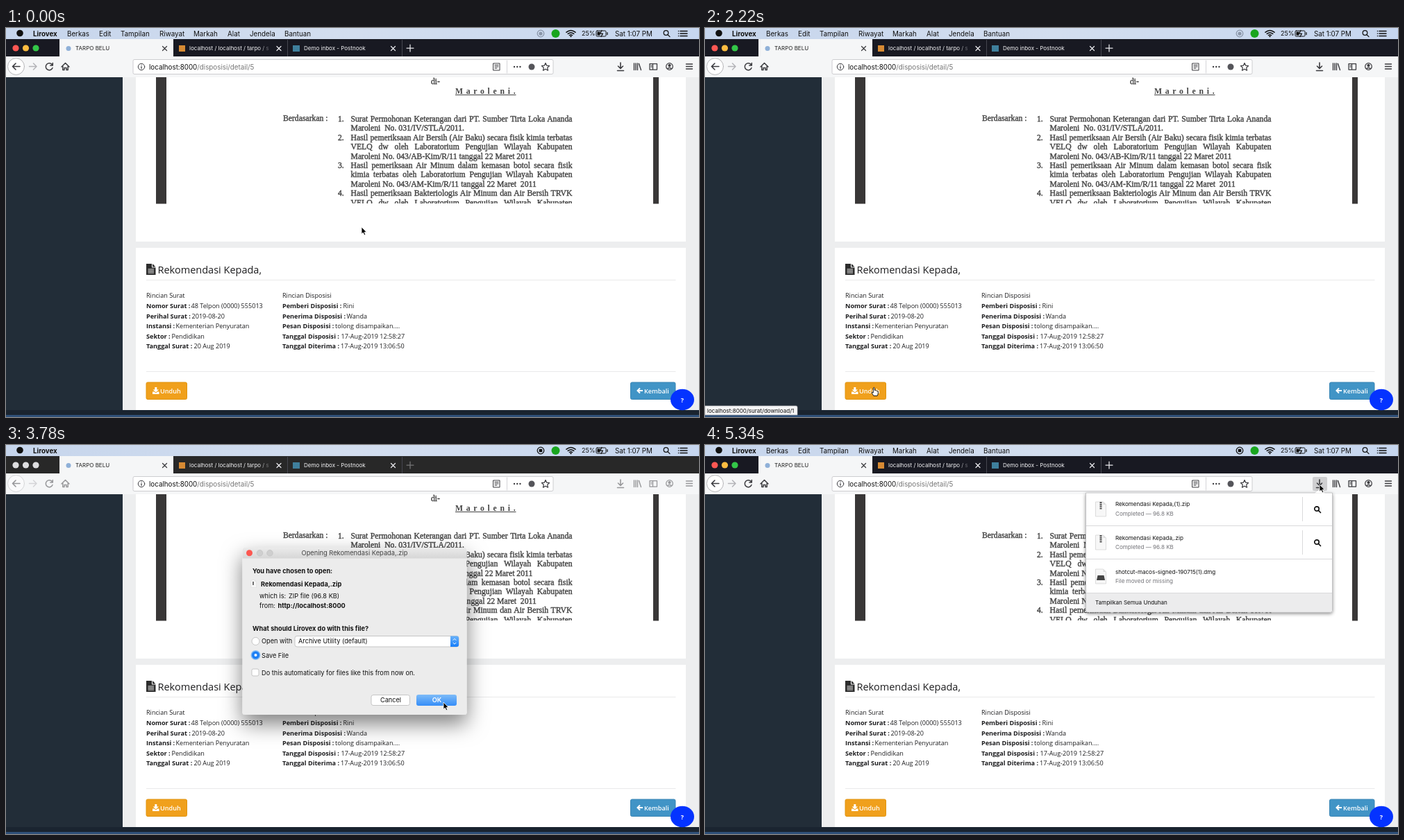
Animation, 998 px wide and 561 px high, one loop 5.4 s. Source, as an HTML page:

```html
<!DOCTYPE html>
<html lang="id">
<head>
<meta charset="utf-8">
<title>Unduh surat</title>
<style>
html, body { margin: 0; width: 100%; height: 100%; overflow: hidden; background: #fff; }
svg { display: block; width: 998px; height: 561px; }
text { white-space: pre; }
.ui { font-family: Inter, Roboto, sans-serif; font-size: 9.8px; fill: #111; }
.tab { font-size: 8px; fill: #f4f4f6; }
.small { font-size: 8.05px; }
.dlg { font-size: 9.2px; }
.b { font-weight: 700; }
.page { font-family: "Open Sans", "Noto Sans", sans-serif; font-size: 9.1px; fill: #1d1d1f; }
.btn { font-weight: 600; fill: #fff; }
.i { fill: none; stroke: #3b3b3f; stroke-width: 1.25; stroke-linecap: round; stroke-linejoin: round; }
.w { stroke: #e8e8ec; }
.doc { font: 11.7px/13.4px "Liberation Serif", "Noto Serif", serif; color: #444; position: relative; height: 182px; overflow: hidden; -webkit-text-stroke: .4px #444; }
.doc div { position: absolute; white-space: nowrap; }
.doc .just { width: 319px; text-align: justify; text-align-last: justify; }
</style>
</head>
<body>
<svg viewBox="0 0 998 561">
  <defs>
    <linearGradient id="bar" x2="0" y2="1"><stop stop-color="#ebebeb"/><stop offset="1" stop-color="#d6d6d6"/></linearGradient>
    <linearGradient id="blue" x2="0" y2="1"><stop stop-color="#6bb3fa"/><stop offset="1" stop-color="#157dfa"/></linearGradient>
    <linearGradient id="sky"><stop stop-color="#c6d5ec"/><stop offset=".5" stop-color="#d3deef"/><stop offset="1" stop-color="#c6d6ef"/></linearGradient>
    <linearGradient id="fade"><stop offset=".83" stop-color="#fff"/><stop offset="1" stop-color="#000"/></linearGradient>
    <mask id="cut"><rect x="264" y="20" width="120" height="20" fill="url(#fade)"/></mask>
    <clipPath id="above"><path d="M0 0H998V551H0Z"/></clipPath>
    <filter id="shade" x="-30%" y="-30%" width="160%" height="170%"><feDropShadow dx="0" dy="13" stdDeviation="15" flood-opacity=".5"/></filter>
    <filter id="soft" x="-10%" y="-10%" width="120%" height="125%"><feDropShadow dx="0" dy="2" stdDeviation="2.5" flood-opacity=".45"/></filter>
    <g id="file"><path d="M0 0H11L15 4V21H0Z" fill="#f7f7f7" stroke="#cfcfcf" stroke-width=".7"/><path d="M11 0V4H15" fill="#ddd"/></g>
    <g id="lens" class="i" style="stroke:#111;stroke-width:1.7"><circle cx="-1" cy="-1" r="3.2"/><path d="M1.5 1.5L4.5 4.5"/></g>
    <path id="x" d="M-3-3L3 3M3-3L-3 3"/>
  </defs>

  <!-- menu bar -->
  <rect width="998" height="16" fill="url(#sky)"/>
  <g class="ui">
    <circle cx="20" cy="7.5" r="4.8"/>
    <text x="39" y="11.5" class="b">Lirovex</text>
    <g id="menus"></g>
    <g id="recOff" class="i" style="stroke:#8a95a8"><circle cx="770" cy="8" r="4.8"/><circle cx="770" cy="8" r="2" fill="#8a95a8"/></g>
    <g id="recOn" class="i" style="stroke:#111"><circle cx="770" cy="8" r="4.8"/><path d="M768.3 6.3H771.7V9.7H768.3Z" fill="#111"/></g>
    <circle cx="791.5" cy="8" r="6" fill="#19a51f"/>
    <g class="i" style="stroke:#111"><path d="M807 6.2Q813.5.8 820 6.2M809.2 8.4Q813.5 5 817.8 8.4M811.4 10.5Q813.5 9 815.6 10.5" stroke-width="1.5"/><circle cx="813.5" cy="12.2" r=".5"/>
      <rect x="850" y="4" width="14" height="8" rx="1.3" stroke-width="1"/><path d="M866 6.5V9.5M858 3.5L855.5 8H859.5L857 12.5"/>
      <circle cx="950.5" cy="7" r="3.3"/><path d="M953 9.6L956 12.6"/><path d="M971 4.5H981M971 8H981M971 11.5H981M968.5 4.5h.1M968.5 8h.1M968.5 11.5h.1" stroke-width="1.5"/></g>
    <rect x="851.5" y="5.5" width="4" height="5"/>
    <text x="829" y="11.3" font-size="9">25%</text>
    <text x="877" y="11.5">Sat 1:07 PM</text>
  </g>

  <!-- tabs -->
  <rect id="strip" y="16" width="998" height="25"/>
  <rect x="77" y="16" width="164" height="25" fill="#f5f6f7"/>
  <g id="lights"><circle cx="14" cy="29" r="4.6"/><circle cx="28.5" cy="29" r="4.6"/><circle cx="43" cy="29" r="4.6"/></g>
  <path d="M405.5 17V41M570.5 17V41" stroke="#45464f"/>
  <circle id="fav" cx="90" cy="29.5" r="3.5" fill="#8fb0d8"/>
  <circle id="dot" cy="29.5" r="1.6" fill="#555"/>
  <rect x="249" y="25" width="9" height="9" fill="#d68a33"/>
  <rect x="413" y="25" width="10" height="9" fill="#3f7f9c"/>
  <g class="ui">
    <text x="100" y="32.3" class="tab" style="fill:#222">TARPO BELU</text>
    <text x="264" y="32.3" class="tab" mask="url(#cut)">localhost / localhost / tarpo / s</text>
    <text x="429" y="32.3" class="tab">Demo inbox - Postnook</text>
  </g>
  <g class="i"><use href="#x" x="228.5" y="29.5"/></g>
  <g class="i w"><use href="#x" x="393" y="29.5"/><use href="#x" x="557.5" y="29.5"/><path id="plus" d="M577 29H587M582 24V34"/></g>

  <!-- toolbar -->
  <rect y="41" width="998" height="30" fill="#f5f6f7"/>
  <rect x="183" y="45.5" width="605" height="21" rx="2" fill="#fff" stroke="#cdcdd0"/>
  <rect id="press" x="875" y="46" width="21" height="20" rx="2" fill="#cfcfd1"/>
  <g id="tools" class="i">
    <circle cx="14.5" cy="55.5" r="12" fill="#fff" stroke="#b5b5b8" stroke-width="1"/>
    <path d="M20 55.5H9.5M14 51L9.5 55.5L14 60" stroke-width="1.6"/>
    <path d="M33.5 55.5H44M39.5 51L44 55.5L39.5 60" stroke="#b4b4b8" stroke-width="1.5"/>
    <path id="reload" d="M66.5 53A5 5 0 1 0 67 57.5M67.3 50.5V54H63.8" stroke-width="1.5"/>
    <path id="stop" d="M57.5 51L66.5 60M66.5 51L57.5 60" stroke-width="1.6"/>
    <path d="M80 56L85.5 50.5L91 56M81.8 55V60.5H84V57.5H87V60.5H89.2V55" stroke-width="1.5"/>
    <path id="down" d="M885 50V58M881.5 55L885 58.5L888.5 55M880.5 61.5H889.5" stroke-width="1.6"/>
    <path d="M904.5 51V60.5M907 51V60.5M909.5 51V60.5M911.5 51.5L914.5 60.5" stroke-width="1.4"/>
    <path d="M927 51.5H937.5V60H927ZM931.5 51.5V60M929 54H930M929 56H930"/>
    <circle cx="955.5" cy="55.5" r="4.8"/><circle cx="955.5" cy="54" r="1.5" fill="#3b3b3f"/><path d="M952.8 58.5Q955.5 56.5 958.2 58.5"/>
    <path d="M979.5 52H988.5M979.5 55.5H988.5M979.5 59H988.5" stroke-width="1.4"/>
  </g>
  <g class="i">
    <circle cx="195" cy="56" r="4.7" stroke-width="1"/><path d="M195 55.5V58.3M195 53.5V53.6"/>
    <path d="M702 51H711V61H702ZM704 53.5H709M704 55.8H709M704 58H707" stroke-width="1"/>
    <path d="M721.5 47V65" stroke="#d5d5d8" stroke-width="1"/>
    <path d="M732 56h.1M736.2 56h.1M740.4 56h.1" stroke-width="2.3"/>
    <path d="M777 50.5L778.7 54.2L782.6 54.6L779.7 57.3L780.5 61.2L777 59.2L773.5 61.2L774.3 57.3L771.4 54.6L775.3 54.2Z"/>
  </g>
  <circle cx="757" cy="56" r="4.5" fill="#55555a"/>
  <text class="ui" x="206" y="59.5">localhost:8000<tspan fill="#777">/disposisi/detail/5</tspan></text>

  <!-- page -->
  <rect y="71" width="998" height="480" fill="#edeeef"/>
  <rect y="71" width="168" height="480" fill="#222d38"/>
  <path d="M187 71H979V308H187ZM187 317H979V551H187Z" fill="#fff"/>
  <path d="M216 71H231V253.5H216ZM932 71H940V253.5H932Z" fill="#393737"/>
  <foreignObject x="187" y="71" width="745" height="182.5"><div class="doc" id="doc"></div></foreignObject>
  <path d="M202 363.5H964.5M202 495.5H964.5" stroke="#e9e9ea"/>
  <path d="M202 340H210V345.5H215.5V356H202Z M211 340L215.5 344.5H211Z" fill="#2c2c2c"/>
  <path d="M204.5 348H213M204.5 350.5H213M204.5 353H213" stroke="#fff"/>
  <g class="page">
    <text x="218.5" y="353.5" font-size="14.5">Rekomendasi Kepada,</text>
    <g id="facts"></g>
    <rect id="save" x="202" y="511" width="58.5" height="24.5" rx="2" fill="#f0a01c"/>
    <rect x="899.5" y="511" width="64.5" height="24.5" rx="2" fill="#4194c6" stroke="#3a86b5"/>
    <path d="M214.3 518H217.3V521.5H220L215.8 525.5L211.6 521.5H214.3ZM211 524.5H213.5L215.8 526.5L218.2 524.5H220.5V528H211Z" fill="#fff"/>
    <path d="M917 523H910M913 519.5L909.5 523L913 526.5" fill="none" stroke="#fff" stroke-width="2"/>
    <text x="222" y="526.5" class="btn">Unduh</text><text x="919" y="526.5" class="btn">Kembali</text>
  </g>
  <rect y="551" width="998" height="10" fill="#1a2430"/><rect y="558" width="998" height="3" fill="#2f5079"/>
  <g id="folder" clip-path="url(#above)"><g id="hop">
    <path d="M698 1Q698 0 699 0H707L709 2H727Q728 2 728 3V26H698Z" fill="#49a5ea"/><rect x="698" y="4" width="30" height="22" rx="1" fill="#61b9fa"/>
    <path d="M708.5 14A4.5 4.5 0 1 1 717 14" fill="none" stroke="#3f9fe6" stroke-width="1.8"/></g></g>
  <ellipse cx="974" cy="536" rx="17" ry="15.2" fill="#0433ff"/>
  <text class="page b" x="974" y="539.5" text-anchor="middle" style="fill:#fff">?</text>
  <g id="status" class="ui"><path d="M0 545H131Q133 545 133 547V558H0Z" fill="#f5f5f6" stroke="#b5b5b8" stroke-width=".7"/><text x="3" y="554.5" class="small">localhost:8000/surat/download/1</text></g>

  <!-- save dialog -->
  <g id="dialog" class="ui dlg">
    <rect id="sheet" x="340.5" y="148" width="323" rx="4" filter="url(#shade)"/>
    <path d="M340.5 163.5V152Q340.5 148 344.5 148H659.5Q663.5 148 663.5 152V163.5Z" fill="url(#bar)"/>
    <circle cx="350.5" cy="155.8" r="4.5" fill="#fc5750"/>
    <g fill="#cfcfcf" stroke="#bcbcbc" stroke-width=".6"><circle cx="365.5" cy="155.8" r="4.3"/><circle cx="380" cy="155.8" r="4.3"/></g>
    <text x="502" y="159.3" text-anchor="middle" fill="#444" font-size="9.3">Opening Rekomendasi Kepada,.zip</text>
    <g id="ask">
      <text x="355" y="184.5" class="b">You have chosen to open:</text>
      <use href="#file" transform="translate(353 195) scale(.5)"/><path d="M356 197V202" stroke="#444" stroke-width="1.5"/>
      <text x="367" y="203.7" class="b">Rekomendasi Kepada,.zip</text>
      <text x="365" y="221">which is:</text><text x="407" y="221">ZIP file (96.8 KB)</text>
      <text x="365" y="235">from:</text><text x="391.5" y="235" class="b">http://localhost:8000</text>
      <text x="355" y="267.5" class="b">What should Lirovex do with this file?</text>
      <g fill="#fff" stroke="#b9b9b9" stroke-width=".8"><circle cx="359.5" cy="283" r="5.5"/><rect x="354" y="323" width="10" height="10" rx="2"/><rect x="416" y="275.5" width="236" height="15.5" rx="3"/><rect x="526" y="360.5" width="55.5" height="15" rx="3"/></g>
      <path d="M640 275.5H649Q652 275.5 652 278.5V288Q652 291 649 291H640Z" fill="url(#blue)"/>
      <path d="M643.8 281.5L646 279.3L648.2 281.5M643.8 285L646 287.2L648.2 285" fill="none" stroke="#fff"/>
      <circle cx="359.5" cy="303" r="7" fill="#87bdf3"/><circle cx="359.5" cy="303" r="5.5" fill="#1d80f5"/><circle cx="359.5" cy="303" r="2" fill="#fff"/>
      <text x="368" y="286.4">Open with</text><text x="421" y="286.4">Archive Utility (default)</text>
      <text x="368" y="306.5">Save File</text>
      <text x="368" y="331.5">Do this automatically for files like this from now on.</text>
      <text x="554" y="371.3" text-anchor="middle">Cancel</text>
      <rect id="ok" x="591" y="360" width="58" height="16" rx="3" fill="url(#blue)"/>
      <text x="620.5" y="371.3" text-anchor="middle" class="btn">OK</text>
    </g>
  </g>

  <!-- downloads -->
  <g id="panel" class="ui small">
    <g filter="url(#soft)"><path d="M548.5 69H903.5V238Q903.5 241 900.5 241H551.5Q548.5 241 548.5 238Z" fill="#fff" stroke="#b8b8ba" stroke-width=".8"/><path d="M878 69.5L885.5 64L893 69.5Z" fill="#fff"/></g>
    <path d="M549 214H903V238Q903 240.6 900.5 240.6H551.5Q549 240.6 549 238Z" fill="#ececed"/>
    <path d="M549 116.5H903M549 164.5H903M549 213.5H903M860.5 75V110M860.5 123V158" stroke="#d9d9db"/>
    <use href="#file" x="562.5" y="82"/><use href="#file" x="562.5" y="130"/><use href="#file" x="562.5" y="179"/>
    <path d="M570 82V93M570 130V141" stroke="#555" stroke-width="3" stroke-dasharray="2 .8"/>
    <path d="M565.5 188H574.5L576 195H564Z" fill="#444"/>
    <text x="591" y="88.3">Rekomendasi Kepada,(1).zip</text><text x="591" y="136.5">Rekomendasi Kepada,.zip</text><text x="591" y="185.7">shotcut-macos-signed-190715(1).dmg</text>
    <g fill="#737378"><text x="591" y="101.5">Completed — 96.8 KB</text><text x="591" y="149.7">Completed — 96.8 KB</text><text x="591" y="198.7">File moved or missing</text></g>
    <text x="562" y="230">Tampilkan Semua Unduhan</text>
    <use href="#lens" x="882" y="93"/><use href="#lens" x="882" y="141"/>
  </g>

  <g id="mouse">
    <path id="arrow" d="M0 0V10.2L2.3 8.1L4 11.8L5.7 11L4.1 7.4H7.2Z" fill="#000" stroke="#fff" stroke-width=".8"/>
    <path id="hand" d="M-1 1Q0-.4 1 1V4.5Q2.2 3.8 2.9 5Q4.1 4.5 4.6 5.6Q6 5.3 6 7V9Q5.6 11 4.8 12.5H-.5Q-1.5 10.5-3.3 8Q-3.3 6.3-1 8Z" fill="#fff" stroke="#000" stroke-width=".9"/>
  </g>
</svg>
<script>
const $ = id => document.getElementById(id);
const show = (id, on) => $(id).style.display = on ? '' : 'none';

const label = (x, y, s, cls = '') => `<text x="${x}" y="${y}" class="${cls}">${s}</text>`;
$('menus').innerHTML = [[88, 'Berkas'], [134, 'Edit'], [165, 'Tampilan'], [221, 'Riwayat'], [270, 'Markah'],
  [319, 'Alat'], [351, 'Jendela'], [401, 'Bantuan']].map(([x, s]) => label(x, 11.5, s)).join('');

// label, value, x of value
const facts = (x, title, rows) => label(x, 389.3, title) + rows.map(([k, v, vx], i) =>
  label(x, 403.9 + i * 14.6, k + ' :', 'b') + label(vx, 403.9 + i * 14.6, v)).join('');
$('facts').innerHTML = facts(202, 'Rincian Surat', [
  ['Nomor Surat', '48 Telpon (0000) 555013', 266.5], ['Perihal Surat', '2019-08-20', 267.5],
  ['Instansi', 'Kementerian Penyuratan', 244.5], ['Sektor', 'Pendidikan', 238.5], ['Tanggal Surat', '20 Aug 2019', 270.5]
]) + facts(398, 'Rincian Disposisi', [
  ['Pemberi Disposisi', 'Rini', 485.5], ['Penerima Disposisi', 'Wanda', 490.5], ['Pesan Disposisi', 'tolong disampaikan....', 474],
  ['Tanggal Disposisi', '17-Aug-2019 12:58:27', 482.5], ['Tanggal Diterima', '17-Aug-2019 13:06:50', 482]
]);

// list number or + before the bar: the line is justified
const lines = [
  '1|Surat Permohonan Keterangan dari PT. Sumber Tirta Loka Ananda',
  '|Maroleni&nbsp; No. 031/IV/STLA/2011.',
  '2|Hasil pemeriksaan Air Bersih (Air Baku) secara fisik kimia terbatas',
  '+|VELQ dw oleh Laboratorium Pengujian Wilayah Kabupaten',
  '|Maroleni No. 043/AB-Kim/R/11 tanggal 22 Maret 2011',
  '3|Hasil pemeriksaan Air Minum dalam kemasan botol secara fisik',
  '+|kimia terbatas oleh Laboratorium Pengujian Wilayah Kabupaten',
  '|Maroleni No. 043/AM-Kim/R/11 tanggal 22 Maret&nbsp; 2011',
  '4|Hasil pemeriksaan Bakteriologis Air Minum dan Air Bersih TRVK',
  '+|VELQ dw oleh Laboratorium Pengujian Wilayah Kabupaten'];
const block = (x, y, s, cls = '', style = '') => `<div class="${cls}" style="left:${x - 187}px;top:${y - 78}px;${style}">${s}</div>`;
$('doc').innerHTML = block(612, 78, 'di-') +
  block(647, 91.5, 'M a r o l e n i .', '', 'font-weight:700;letter-spacing:.9px;text-decoration:underline;-webkit-text-stroke:0') +
  block(399, 131, 'Berdasarkan :') +
  lines.map((l, i) => {
    const [n, s] = l.split('|'), y = 132 + i * 13.4;
    return (+n ? block(478, y, n + '.') : '') + block(496.5, y, s, n ? 'just' : '');
  }).join('');

// time, x, y of the pointer tip
const path = [[60, 512, 287], [480, 244, 518], [3240, 243, 518], [3600, 630, 371], [4140, 630, 371],
  [4560, 850, 93], [4740, 854, 87], [4800, 854, 87], [5040, 885, 57]];
function pointer(t) {
  const n = path.findIndex(p => p[0] > t);
  if (n < 1) return (n ? path[path.length - 1] : path[0]).slice(1);
  const [a, b] = [path[n - 1], path[n]], u = (t - a[0]) / (b[0] - a[0]), e = u * u * (3 - 2 * u);
  return [1, 2].map(k => a[k] + (b[k] - a[k]) * e);
}

function draw(t) {
  const within = (a, b) => t >= a && t < b;
  const modal = within(2640, 4140), loading = within(720, 2220), asked = t >= 2820, open = t >= 5160;
  show('menus', !modal);
  show('recOff', t < 2700);
  show('recOn', t >= 2700);
  $('strip').setAttribute('fill', modal ? '#282828' : '#181922');
  [...$('lights').children].forEach((c, i) => c.setAttribute('fill', modal ? '#dedee0' : ['#fc5753', '#fdbc40', '#33c748'][i]));
  $('tools').setAttribute('opacity', modal ? .5 : 1);
  $('plus').setAttribute('opacity', modal ? .4 : 1);
  show('reload', !loading);
  show('stop', loading);
  show('fav', !loading);
  show('dot', loading);
  $('dot').setAttribute('cx', t < 1380 ? 90 - 4.5 * Math.cos((t - 720) / 660 * Math.PI * 3) : 94.5);
  $('down').style.stroke = t >= 4140 && !open ? '#0a84ff' : '';
  show('press', open);
  show('panel', open);
  $('panel').setAttribute('opacity', t < 5220 ? .6 : 1);
  $('save').setAttribute('stroke', within(4140, 5100) ? '#a4660f' : '#e0940f');
  show('status', within(480, 2700));
  show('dialog', modal);
  show('ask', asked);
  $('sheet').setAttribute('height', asked ? 241 : 261);
  $('sheet').setAttribute('fill', asked ? '#ececec' : '#fff');
  $('ok').setAttribute('opacity', within(3780, 4140) ? .85 : 1);
  show('folder', within(4140, 4420));
  $('hop').setAttribute('transform', `translate(0 ${551 - 28 * Math.sin((t - 4020) / 400 * Math.PI)})`);
  const hand = within(480, 2640);
  show('hand', hand);
  show('arrow', !hand);
  $('mouse').setAttribute('transform', `translate(${pointer(t)})`);
}

const start = performance.now();
(function tick() {
  const t = (performance.now() - start) % 5400;
  draw(Math.floor(t / 60) * 60);
  requestAnimationFrame(tick);
})();
</script>
</body>
</html>
```
